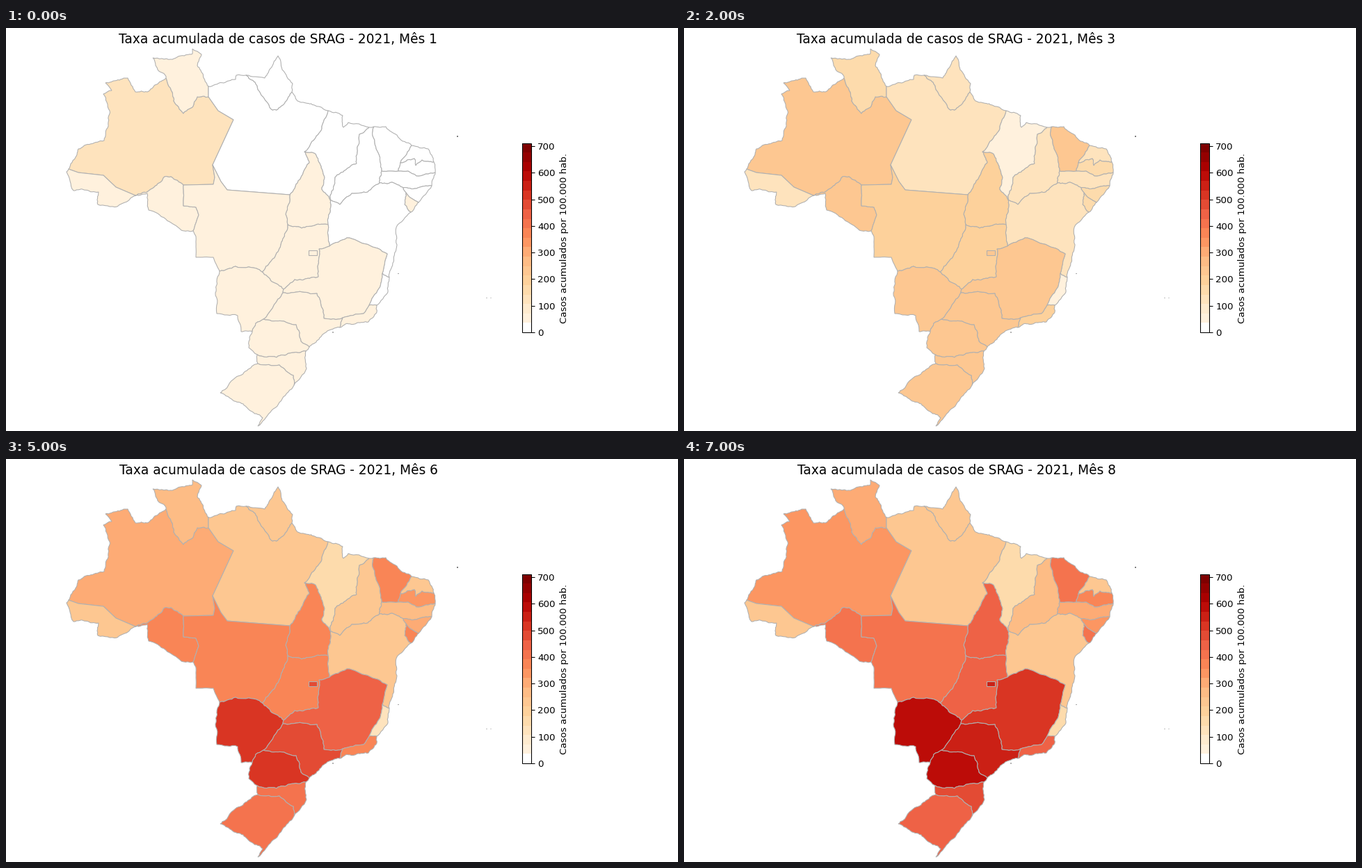
Write a matplotlib script that moves like this. It is 966 px wide and 580 px high and loops after 8000 ms.

```python
import numpy as np
import matplotlib.pyplot as plt
from matplotlib.animation import FuncAnimation
from matplotlib.patches import Polygon, Rectangle

W, H, DPI = 966, 580, 64
PX = 72 / DPI  # points per pixel
MONTHS = 8
LEVELS = 20

rng = np.random.default_rng(4)
colors = plt.get_cmap("OrRd")(np.linspace(0, 1, LEVELS))
colors[0] = (1, 1, 1, 1)

fig = plt.figure(figsize=(W / DPI, H / DPI), dpi=DPI, facecolor="white")
ax = fig.add_axes([0, 0, 1, 1])
ax.set_xlim(0, W)
ax.set_ylim(H, 0)
ax.axis("off")

# Points where borders meet: on the outer rim, clockwise, and inland
RIM = [(230, 72), (291, 84), (345, 68), (391, 40), (411, 92), (463, 119),
       (522, 143), (529, 142), (583, 169), (615, 193), (617, 208), (612, 227),
       (593, 251), (582, 265), (551, 359), (533, 399), (480, 431), (436, 459),
       (431, 465), (414, 514), (362, 573), (362, 483), (361, 470), (354, 437),
       (307, 350), (269, 292), (186, 241), (97, 234), (90, 203)]
INLAND = [(291, 99), (297, 197), (255, 226), (408, 240), (429, 178), (466, 247),
          (540, 206), (537, 223), (567, 194), (564, 206), (571, 230), (575, 237),
          (463, 283), (405, 283), (465, 314), (541, 353), (368, 351), (399, 376),
          (398, 381), (370, 419), (484, 417), (522, 399)]
nodes = {f"c{i}": p for i, p in enumerate(RIM)}
nodes.update({f"i{i}": p for i, p in enumerate(INLAND)})

borders = {}
states = []


def rugged(a, b, rough):
    """Points from a up to b, the midpoint pushed sideways again and again."""
    d = b - a
    size = np.hypot(*d)
    if size < 4 or rough == 0:
        return [a]
    side = np.array([-d[1], d[0]]) / size
    mid = (a + b) / 2 + side * rng.uniform(-rough, rough) * np.sqrt(size)
    return rugged(a, mid, rough) + rugged(mid, b, rough)


def bend(ends, *xy, rough=0.33):
    """Lay the border between two nodes by way of some key points."""
    a, b = ends.split()
    pts = np.array([*nodes[a], *xy, *nodes[b]], float).reshape(-1, 2)
    path = [p for s, e in zip(pts, pts[1:]) for p in rugged(s, e, rough)]
    borders[a, b] = np.array(path + [pts[-1]])
    borders[b, a] = borders[a, b][::-1]


def state(ring, first, last, pace=1.12):
    """Add the state inside a ring of nodes, with its first and last level."""
    ring = ring.split()
    sides = list(zip(ring, ring[1:] + ring[:1]))
    for a, b in sides:
        if (a, b) not in borders:
            bend(f"{a} {b}")
    shape = np.vstack([borders[side][:-1] for side in sides])
    patch = Polygon(shape, closed=True, ec="#b0b0b0", lw=1.07 * PX)
    ax.add_patch(patch)
    states.append((patch, first, last, pace))


# Rim
bend("c0 c1", 229, 68, 218, 60, 211, 43, 237, 45, 268, 37, 268, 30, 281, 38, 275, 54)
bend("c1 c2", 330, 74, 331, 68)
bend("c2 c3", 372, 72)
bend("c3 c4", 397, 60, 412, 80)
bend("c4 c5", 419, 105, 450, 113)
bend("c5 c6", 484, 126, 485, 143, 492, 136)
bend("c7 c8", 546, 142)
bend("c8 c9", 607, 174)
bend("c13 c14", 561, 287, 562, 312)
bend("c14 c15", 549, 380)
bend("c15 c16", 533, 409, 521, 423, 488, 426)
bend("c16 c17", 460, 438)
bend("c18 c19", 432, 490)
bend("c19 c20", 380, 553)
bend("c20 c21", 369, 561, 341, 541, 308, 525, 330, 503)
bend("c22 c23", 349, 460)
bend("c23 c24", 338, 437, 333, 414, 303, 411, 301, 381)
bend("c24 c25", 298, 330, 273, 330, 273, 300, rough=0.1)
bend("c25 c26", 252, 291, 205, 262, 203, 238)
bend("c26 c27", 160, 257, 132, 254, 133, 236)
bend("c27 c28", 87, 207)
bend("c28 c0", 104, 174, 141, 162, 149, 119, 140, 95, 152, 90, 143, 79, 175, 72,
     186, 92, 203, 92)

# Inland borders, first the surveyed straight ones
bend("c1 i0", rough=0)
bend("i0 i1", 305, 119, 327, 132, rough=0)
bend("i1 i2", 300, 215, 298, 225, rough=0)
bend("i1 i3", 309, 221, 318, 233, rough=0)
bend("c26 c28", 158, 229, 140, 212, 104, 208, rough=0)
bend("i2 c25", 255, 256, 273, 258, 277, 269, rough=0.15)
bend("i0 c0", 275, 99, 268, 114, 255, 123, 241, 105)
bend("c26 i2", 203, 236, 228, 214, 237, 214)
bend("c24 i16", 330, 343, 360, 346)
bend("i16 i13", 392, 320)
bend("i13 i3", 402, 268)
bend("c2 c4", 358, 78, 383, 118, 389, 118)
bend("c5 i4", 454, 145)
bend("i4 i3", 436, 194, 420, 220)
bend("i4 i5", 443, 180, 458, 215, 454, 232)
bend("c6 i5", 508, 153, 504, 195, 473, 215)
bend("c7 i6", 527, 155)
bend("i7 i5", 520, 236, 497, 238, 480, 254)
bend("i9 i6", 549, 206)
bend("c9 i8", 598, 190, 589, 198, 587, 188)
bend("c10 i9", 590, 213, 578, 206)
bend("c11 i10", 590, 231)
bend("i10 i7", 555, 222)
bend("i11 c13", 573, 254)
bend("i15 i14", 548, 325, 490, 302)
bend("i13 i12", 425, 288)
bend("i14 i17", 450, 318, 449, 358, 415, 362)
bend("i18 i20", 447, 382, 457, 418)
bend("i20 i21", 514, 411)
bend("i21 i15", 536, 375)
bend("c17 i19", 424, 451, 417, 427)
bend("i19 c23", 359, 425)
bend("c18 c22", 408, 468, 389, 474)
bend("c19 c21", 413, 500, 393, 485)

# North
state("c0 i0 i1 i2 c26 c28", 3, 8.6, 0.9)
state("c0 c1 i0", 1, 8)
state("c26 c27 c28", 1.2, 6.4)
state("c26 i2 c25", 1.4, 11, 0.9)
state("c1 c2 c4 c5 i4 i3 i1 i0", 0, 6, 0.9)
state("c2 c3 c4", 0, 6, 0.9)
state("i4 i5 i12 i13 i3", 0.5, 11.5)
# Northeast
state("c5 c6 i5 i4", 0, 4.4, 1.4)
state("c6 c7 i6 i7 i5", 0.4, 6.8)
state("c7 c8 i8 i9 i6", 0, 11.4, 0.9)
state("c8 c9 i8", 0, 6.4, 0.9)
state("c9 c10 i9 i8", 0.4, 10)
state("c10 c11 i10 i7 i6 i9", 0.4, 8.4)
state("c11 c12 i11 i10", 0.4, 9)
state("c12 c13 i11", 0.5, 11)
state("c13 c14 i15 i14 i12 i5 i7 i10 i11", 0, 6, 0.9)
# Centre
state("i2 i1 i3 i13 i16 c24 c25", 0.5, 11.2)
state("i13 i12 i14 i17 i16", 0.5, 11.5)
state("c24 i16 i17 i18 i19 c23", 0.5, 15.6)
# Southeast
state("i14 i15 i21 i20 i18 i17", 0.5, 14)
state("c14 c15 i21 i15", 0, 4, 1.4)
state("c15 c16 i20 i21", 0.5, 11.5)
state("c16 c17 i19 i18 i20", 0.5, 14.6)
# South
state("c17 c18 c22 c23 i19", 0.5, 15.5)
state("c18 c19 c21 c22", 1.4, 12.7)
state("c19 c20 c21", 1.4, 12.4)

# Federal district
district = Rectangle((434.5, 319.5), 12.5, 7.5, ec="#b0b0b0", lw=1.07 * PX)
ax.add_patch(district)
states.append((district, 0.5, 15, 1.12))

# Islands
for x, y, tone in [(649, 156, "0.5"), (691, 388.5, "0.75"), (697, 388.5, "0.8"),
                   (564, 353.5, "0.65"), (470, 438, "0.7")]:
    ax.add_patch(Rectangle((x - 0.7, y - 0.7), 1.4, 1.4, fc=tone, lw=0))

# Colour bar
LEFT, RIGHT, TOP, BOTTOM = 741.5, 755, 165.5, 438
STEP = (BOTTOM - TOP) / LEVELS
for i, c in enumerate(colors):
    ax.add_patch(Rectangle((LEFT, BOTTOM - (i + 1) * STEP), RIGHT - LEFT, STEP,
                           fc=c, lw=0, antialiased=False))
ax.add_patch(Rectangle((LEFT, TOP), RIGHT - LEFT, BOTTOM - TOP, fill=False,
                       ec="black", lw=1.07 * PX))
for value in range(0, 701, 100):
    y = BOTTOM - value * 0.3828
    ax.plot([RIGHT, RIGHT + 4.7], [y, y], color="black", lw=1.07 * PX,
            solid_capstyle="butt")
    ax.text(764.3, y, str(value), size=13.33 * PX, va="center_baseline")
ax.text(795.6, 302.5, "Casos acumulados por 100.000 hab.", size=13.33 * PX,
        rotation=90, ha="left", va="center")

title = ax.text(391.5, 22, "", size=18.67 * PX, ha="center", va="baseline")


def update(frame):
    title.set_text(f"Taxa acumulada de casos de SRAG - 2021, Mês {frame + 1}")
    t = frame / (MONTHS - 1)
    for patch, first, last, pace in states:
        level = first + (last - first) * np.sin(np.pi / 2 * t ** pace)
        patch.set_facecolor(colors[int(level + 0.5)])
    return []


anim = FuncAnimation(fig, update, frames=MONTHS, interval=1000, repeat=True,
                     repeat_delay=0, init_func=lambda: update(0))
plt.show()
```
